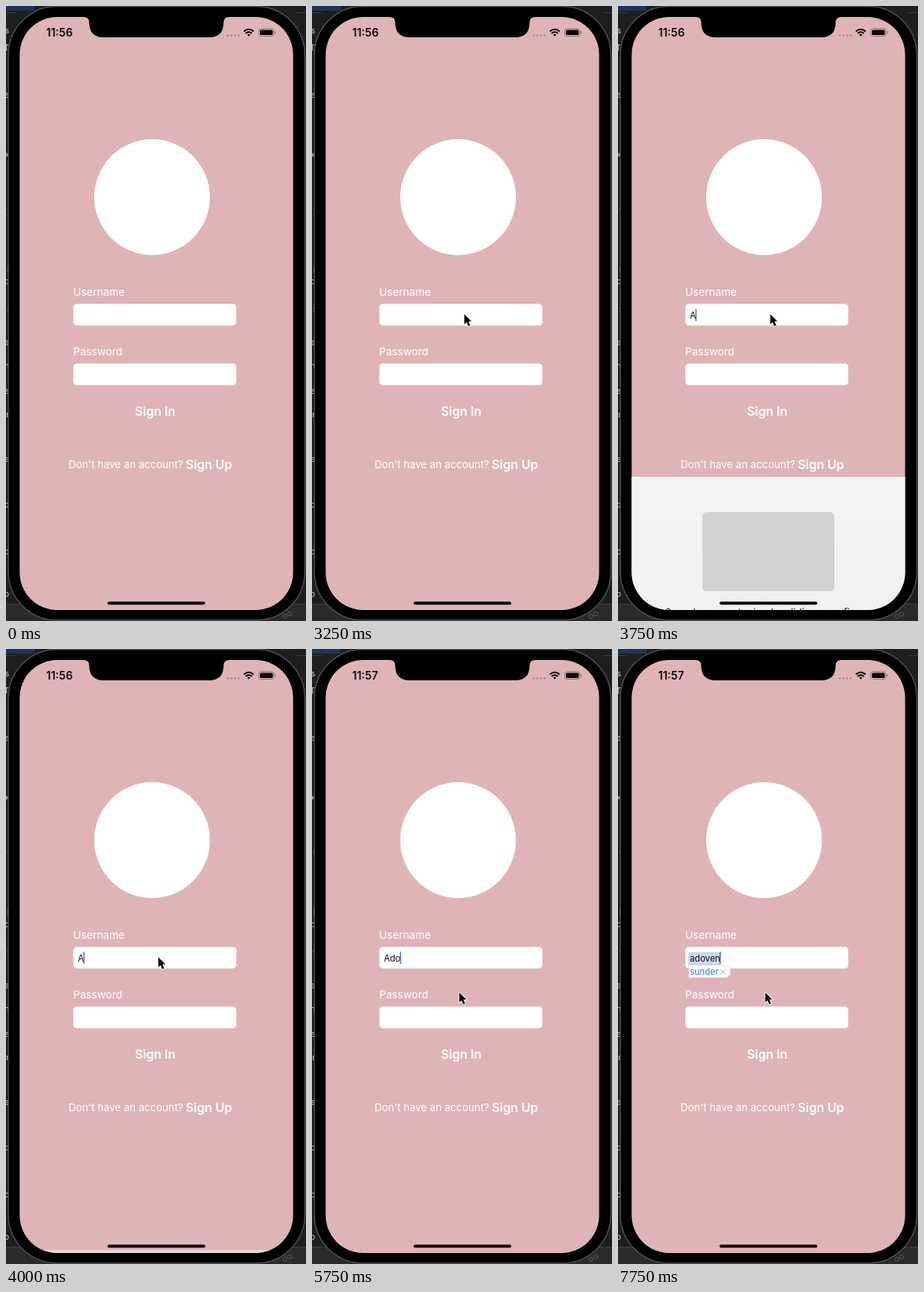
Recreate the animation shown at these times as an HTML page. Size 384x785 px, loop 8 s.

```html
<!DOCTYPE html>
<html lang="en">
<head>
<meta charset="utf-8">
<title>Sign in</title>
<style>
  html, body { margin: 0; width: 100%; height: 100%; overflow: hidden; background: #1d1e20; }
  svg { display: block; width: 100vw; height: 100vh; }
  text { font-family: Inter, Roboto, sans-serif; fill: #fff; white-space: pre; }
  .label { font-size: 13.6px; }
  .bold { font-size: 15.8px; font-weight: 600; }
  .mid { text-anchor: middle; }
  .field { fill: #fff; stroke: #f3e3e4; stroke-width: .6; }
  .typed { font-size: 11.2px; fill: #111; }
  .tip { font-size: 13px; fill: #0c0c0c; }
  .code text { font-size: 10px; fill: #c9c9cb; text-anchor: end; }
</style>
</head>
<body>
<svg viewBox="0 0 384 785" preserveAspectRatio="none">
  <defs>
    <clipPath id="screen"><rect x="17.5" y="14" width="350" height="757" rx="48"/></clipPath>
    <linearGradient id="sheet" x1="0" y1="0" x2="0" y2="1">
      <stop offset="0" stop-color="#f4f4f4"/>
      <stop offset="1" stop-color="#f0eff1"/>
    </linearGradient>
  </defs>

  <!-- desktop behind the phone -->
  <rect width="384" height="785" fill="#1d1e20"/>
  <rect width="37" height="6" fill="#20325a"/>
  <path d="M0 8.5H12M372 8.5H384" stroke="#3b3c3e"/>
  <g class="code" id="code"></g>
  <rect y="763" width="384" height="22" fill="#2a2a2b"/>
  <path d="M0 763.5H384" stroke="#3d3d3e"/>

  <!-- phone -->
  <rect x="3" y=".5" width="379.5" height="783.5" rx="62" stroke="#505153" stroke-width="1.4"/>
  <rect x="5.5" y="3" width="374.5" height="778.5" rx="59.500"/>
  <g fill="none" stroke="#58585a"><circle cx="357" cy="779" r="2.5"/><circle cx="363" cy="776" r="2.5"/></g>

  <g clip-path="url(#screen)">
    <rect x="17" y="14" width="351" height="757" fill="#dfb4b7"/>

    <circle cx="187" cy="244" r="74" fill="#fff"/>

    <text class="label" x="86" y="370">Username</text>
    <text class="label" x="86" y="446">Password</text>
    <rect class="field" x="86.300" y="380.300" width="208.400" height="27.400" rx="4.500"/>
    <rect class="field" x="86.300" y="456.500" width="208.400" height="27.400" rx="4.500"/>
    <g id="shade" fill="#f2f2f2">
      <path d="M86 386H295V403.500Q295 408 290.500 408H90.500Q86 408 86 403.500Z"/>
      <rect x="86" y="456.500" width="209" height="27.500" rx="4.500"/>
    </g>
    <text class="bold mid" x="191" y="522.500">Sign In</text>
    <text x="80" y="590" font-size="13.200">Don't have an account?</text>
    <text class="bold" x="230" y="591">Sign Up</text>

    <rect id="mark" x="90" y="387" height="16" fill="#cbd8ea"/>
    <text id="typed" class="typed" x="92" y="398.500"></text>
    <rect id="caret" y="386.500" width="1.400" height="15.500" fill="#3f68dc"/>
    <g id="hint">
      <path d="M90.500 403.500H136Q144 404 144 411.800Q144 419.500 136 419.500H90.500Z" fill="#fff" stroke="#d8cfd2" stroke-width=".7"/>
      <text x="92" y="416" font-size="11.200" style="fill:#3a7be0">sunder</text>
      <path d="M131 408.500l7 7m0-7l-7 7" stroke="#a9a9ad" stroke-width="1"/>
    </g>

    <g id="panel">
      <rect x="17" y="521" width="351" height="251" fill="url(#sheet)"/>
      <rect x="108" y="566" width="169" height="101" rx="5.500" fill="#d3d3d3"/>
      <text class="tip mid" x="192.500" y="698.500">Speed up your typing by sliding your finger</text>
      <text class="tip mid" x="192.500" y="716">across the letters to compose a word.</text>
      <text class="mid" x="192.500" y="741.500" font-size="14" font-weight="600" style="fill:#3a7df0">Continue</text>
    </g>
    <rect x="130" y="760.300" width="125" height="4" rx="2" fill="#12100e"/>
  </g>

  <!-- notch and status bar -->
  <path d="M99 13V14Q106.500 14 106.500 21Q106.500 40 125 40H260Q278.500 40 278.500 21Q278.500 14 286 14V13Z"/>
  <text id="clock" x="51.500" y="39" font-size="14" font-weight="600" style="fill:#0b0808"></text>
  <g fill="#a98b8e">
    <circle cx="284" cy="37.500" r="1.300"/><circle cx="288.600" cy="37.500" r="1.300"/>
    <circle cx="293.200" cy="37.500" r="1.300"/><circle cx="297.800" cy="37.500" r="1.300"/>
  </g>
  <g fill="none" stroke="#0b0808" stroke-width="2">
    <path d="M304.500 32.500Q310.700 27 317 32.500M306.700 35Q310.700 31.500 314.800 35"/>
    <path d="M308.800 36.500Q310.700 35.200 312.700 36.500L310.700 38.700Z" fill="#0b0808" stroke="none"/>
  </g>
  <rect x="323.500" y="29" width="19.500" height="9.500" rx="2.800" fill="none" stroke="#8f7779"/>
  <rect x="325" y="30.500" width="16.500" height="6.500" rx="1.600" fill="#0b0808"/>
  <path d="M344.300 32.200Q345.800 33.800 344.300 35.400Z" fill="#8f7779" stroke="#8f7779" stroke-width=".6"/>

  <path id="mouse" d="M1 1.500V14L3.900 11.400L6 16.400L8.400 15.400L6.300 10.500H10.100Z" stroke="#fff" stroke-width="2" stroke-linejoin="round" paint-order="stroke"/>
</svg>
<script>
  const LOOP = 8000, STEP = 250;
  const $ = id => document.getElementById(id);
  const show = (id, on) => $(id).style.display = on ? '' : 'none';
  const place = (id, x, y) => $(id).setAttribute('transform', `translate(${x} ${y})`);

  // rows: start time, then the values held until the next row
  const mouse = [
    [0, 400, 100], [750, 371, 153], [1000, 342, 226], [1250, 302, 330], [1500, 272, 399],
    [1750, 279, 401], [2000, 270, 401], [2250, 243, 398], [2500, 214, 394], [2750, 197, 392],
    [3000, 194, 392], [4750, 193, 402], [5000, 189, 424], [5250, 187.5, 437]
  ];
  const typing = [
    [0, null], [3500, ''], [3750, 'A'], [4500, 'Ad'], [5500, 'Ado'], [6000, 'A'],
    [6250, 'a'], [6500, 'ado'], [6750, 'adove'], [7000, 'adoven']
  ];
  // offset and opacity of the keyboard sheet
  const sheet = [[0, 260, 0], [3500, 0, 1], [3750, 80, 1], [4000, 246, .5], [4250, 260, 0]];
  const at = (rows, t) => rows.filter(r => r[0] <= t).pop();

  const edge = [[35, 's'], [57, 'T'], [117, 'e'], [193, 'x'], [259, '.'], [340, 'l'], [355, 'c'],
    [390, ':'], [433, 'a'], [463, 'n'], [495, 'e'], [525, 'r'], [582, 'a'], [640, 'o'], [700, 'd'], [754, 'lo']];
  $('code').innerHTML = edge.map(([y, s]) => `<text x="4" y="${y}">${s}</text>`).join('');

  function draw(time) {
    const t = Math.floor(time % LOOP / STEP) * STEP;
    const [, x, y] = at(mouse, t);
    place('mouse', x, y);
    const [, drop, alpha] = at(sheet, t);
    place('panel', 0, drop);
    $('panel').setAttribute('opacity', alpha);
    show('shade', t === 3500);

    const word = at(typing, t)[1];
    $('typed').textContent = word || '';
    const end = 92 + (word ? $('typed').getComputedTextLength() : 0);
    $('caret').setAttribute('x', end - .6);
    show('caret', word !== null);

    const corrected = t >= 7250;
    $('mark').setAttribute('width', end - 90);
    show('mark', corrected);
    show('hint', corrected);
    $('clock').textContent = t < 5000 ? '11:56' : '11:57';
  }

  const start = performance.now();
  function tick() {
    draw(performance.now() - start);
    requestAnimationFrame(tick);
  }
  tick();
</script>
</body>
</html>
```
